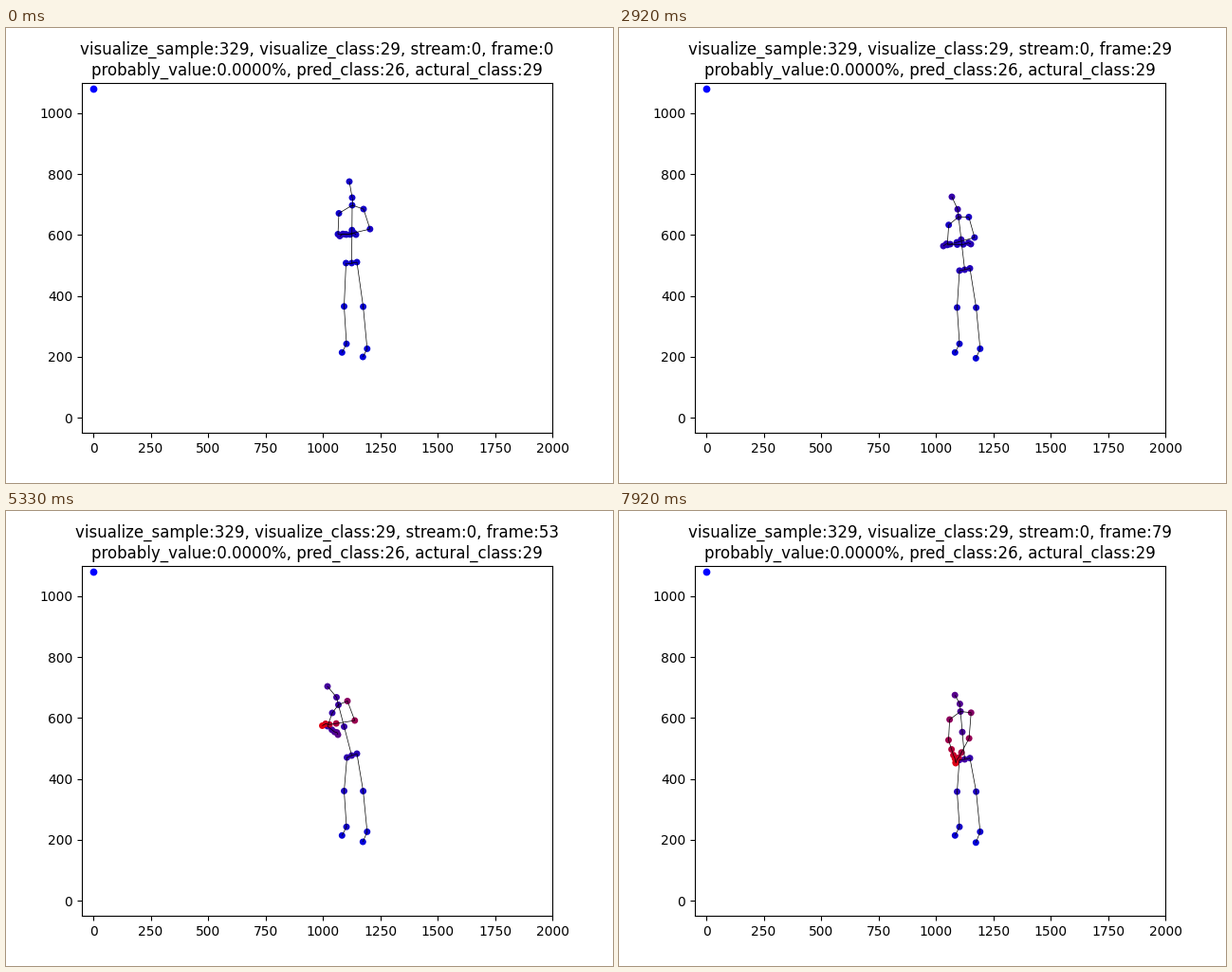
A matplotlib script that plays this animation: 640x480 px, repeating every 8 s.

```python
import matplotlib.pyplot as plt
import numpy as np
from matplotlib.animation import FuncAnimation
from matplotlib.collections import LineCollection

LOOP_MS, STEP_MS = 8000, 25
XLIM, YLIM = (-50, 2000), (-50, 1100)

# Driving motions as (pose number, value); positions are stage pixels.
LEAN = [(0, 0), (18, 0.2), (29, 0.48), (44, 0.62), (53, 1), (67, 0.97), (79, 0.34)]
DROP = [(0, 0), (18, 3.3), (29, 7), (44, 5.5), (53, 10), (67, 11), (79, 14)]
NEAR_X = [(0, 369), (29, 371), (44, 366), (53, 350), (67, 344), (79, 355)]
NEAR_Y = [(0, 218), (29, 228), (44, 222.5), (53, 236), (67, 243), (79, 265)]
FAR_X = [(0, 352), (18, 352), (29, 342), (44, 339), (50, 325), (53, 333.5),
         (57, 333), (63, 312), (67, 338), (79, 355)]
FAR_Y = [(0, 219.5), (29, 230), (44, 218.5), (53, 226.5), (67, 242), (79, 266)]
NEAR_HEAT = [(0, 0.1), (44, 0.18), (53, 0.36), (67, 0.85), (79, 0.96)]
FAR_HEAT = [(0, 0.14), (18, 0.38), (29, 0.18), (44, 0.62), (53, 0.93), (79, 0.9)]

# Joint order: trunk 0-6, near arm 7-12, far arm 13-18, legs 19-24.
CHAINS = [
    [0, 1, 2, 3, 4], [2, *range(7, 13)], [2, *range(13, 19)],
    [4, 5, 19, 21, 23], [4, 6, 20, 22, 24],
]
BONES = [pair for c in CHAINS for pair in zip(c, c[1:])]


def track(keys, n):
    """Eased value between neighbouring keys."""
    times, values = zip(*keys)
    i = np.interp(n, times, range(len(times)))
    u = i % 1
    return np.interp(i - u + u * u * (3 - 2 * u), range(len(values)), values)


def arm(shoulder, elbow, tip, wrist_at, hand_at):
    """Shoulder to fingertip, with the forearm joints along one line."""
    reach = tip - elbow
    thumb = elbow + 0.9 * reach - [0, 1.5]
    return [shoulder, elbow, elbow + wrist_at * reach,
            elbow + hand_at * reach, thumb, tip]


def pose(n):
    lean, drop = track(LEAN, n), track(DROP, n)
    chest = np.array([365 - 14.5 * lean, 187 + 1.75 * drop])
    pelvis = np.array([364.5, 248 + drop])
    trunk = [
        chest + [-3 - 8.5 * lean, -25 + 0.55 * drop],
        chest + [-2 * lean, -8],
        chest,
        pelvis + 0.57 * (chest - pelvis),
        pelvis,
        pelvis + [-6 + lean, 2 * lean],
        pelvis + [5.5, -1 - lean],
    ]

    near = np.array([track(NEAR_X, n), track(NEAR_Y, n)])
    shoulder = chest + [-14 + 7.5 * lean, 8.5]
    elbow = shoulder + [-1 - 4 * lean ** 3, 22 - 8 * lean ** 3]
    near_arm = arm(shoulder, elbow, near, 0.42, 0.68)

    far = np.array([track(FAR_X, n), track(FAR_Y, n)])
    shoulder = chest + [12 - 2.5 * lean, 4 - 8 * lean]
    droop = (far[1] - shoulder[1] - 28) / 25
    elbow = shoulder + [7 - 9 * droop, 21 + 6 * droop]
    far_arm = arm(shoulder, elbow, far, 0.57, 0.78)

    legs = [
        (356.5, 293.7 + 0.17 * drop), (376.6, 294 + 0.15 * drop),
        (359, 333.2), (380.8, 338.4),
        (354.3, 342.3), (376.3, 347 + 0.2 * drop),
    ]
    return to_data(np.array(trunk + near_arm + far_arm + legs))


def to_data(px):
    x = XLIM[0] + (px[:, 0] - 80) * (XLIM[1] - XLIM[0]) / 496
    y = YLIM[0] + (427.2 - px[:, 1]) * (YLIM[1] - YLIM[0]) / 369.6
    return np.column_stack([x, y])


def colours(n):
    """Blue when cool, red when hot; arms heat up toward the fingertips."""
    body = 0.08 + 0.02 * track(DROP, n)
    gain = np.linspace(0.6, 1, 6)
    v = np.concatenate([
        body * np.linspace(1, 0.6, 7), track(NEAR_HEAT, n) * gain,
        track(FAR_HEAT, n) * gain, body * np.linspace(0.4, 0, 6),
    ])
    return np.column_stack([0.95 * v, 0 * v, 0.85 * (1 - v)])


def title(n):
    return (f"visualize_sample:329, visualize_class:29, stream:0, frame:{n}\n"
            "probably_value:0.0000%, pred_class:26, actural_class:29")


fig, ax = plt.subplots(figsize=(6.4, 4.8), dpi=100)
ax.set_xlim(*XLIM)
ax.set_ylim(*YLIM)
# The absent second body collapses to one corner point.
ax.scatter([0], [1080], s=31, c="blue", linewidths=0)
joints = ax.scatter([0] * 25, [0] * 25, s=25, linewidths=0)
bones = ax.add_collection(
    LineCollection([], colors="black", linewidths=0.5, zorder=2),
    autolim=False)
heading = ax.set_title(title(0))


def draw(i):
    # Ten poses per second, shown on a clock of twelve ticks per second.
    tick = int((i * STEP_MS + 20) * 12 / 1000)
    n = (5 * tick + 2) // 6
    pts = pose(n)
    joints.set_offsets(pts)
    joints.set_facecolor(colours(n))
    bones.set_segments([pts[[a, b]] for a, b in BONES])
    heading.set_text(title(n))
    return joints, bones, heading


anim = FuncAnimation(fig, draw, frames=LOOP_MS // STEP_MS, interval=STEP_MS,
                     repeat=True, repeat_delay=0, blit=False)
plt.show()
```
